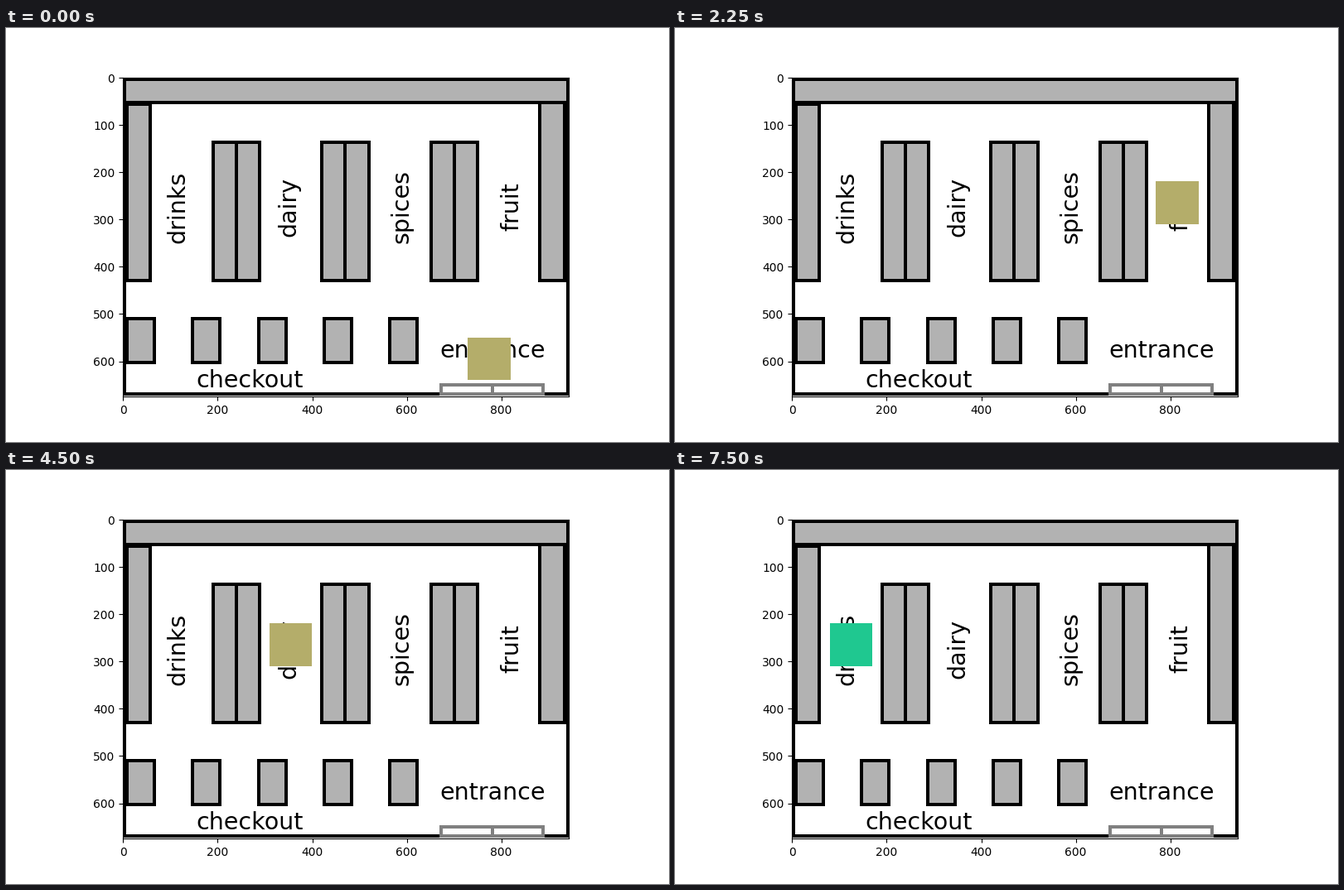
These frames come from a looping animation (800 by 500 pixels, 8000 ms). A matplotlib script:

```python
import matplotlib.pyplot as plt
from matplotlib.animation import FuncAnimation
from matplotlib.patches import Rectangle

INTERVAL = 250
FRAMES = 32
FRAMES_PER_STEP = 3
MAP_WIDTH, MAP_HEIGHT = 943, 675
SHELF = "#b2b2b2"
OLIVE, GREEN = "#b4ad6a", "#1fc890"
LINE_PX = 4
CUSTOMER_SIZE = 90

# Top-left corner of the customer at each place
PLACES = {
    "entrance": (730, 550),
    "fruit": (770, 220),
    "spices": (540, 220),
    "dairy": (310, 220),
    "drinks": (80, 220),
    "checkout": (205, 590),
}
VISITS = [
    (OLIVE, "entrance fruit spices fruit fruit spices dairy dairy checkout"),
    (GREEN, "entrance drinks"),
]
ROUTE = [(color, place) for color, path in VISITS for place in path.split()]

fig, ax = plt.subplots(figsize=(8, 5), dpi=100)
ax.set_xlim(-0.5, MAP_WIDTH - 0.5)
ax.set_ylim(MAP_HEIGHT - 0.5, -0.5)
ax.set_aspect("equal")


def box(left, top, right, bottom, face=SHELF, edge="black"):
    ax.add_patch(Rectangle((left, top), right - left, bottom - top,
                           facecolor=face, edgecolor=edge,
                           linewidth=LINE_PX * 72 / fig.dpi, zorder=1))


def label(text, x, y, rotation=0):
    ax.text(x, y, text, family="DejaVu Sans", size=20.5, rotation=rotation,
            rotation_mode="anchor", ha="left", va="baseline", zorder=1.5)


def draw_store():
    box(3, 3, 940, 669, face="white")
    box(3, 3, 940, 52)
    box(8, 55.5, 58, 429)
    box(882, 52, 933, 429)
    for aisle in range(3):
        left = 190 + 230.5 * aisle
        box(left, 137, left + 49.5, 429)
        box(left + 49.5, 137, left + 99, 429)
    for till in range(5):
        left = 8.5 + 139 * till
        box(left, 510.5, left + 57.5, 602.5)
    for left, right in ((672.5, 781), (781, 889)):
        box(left, 650, right, 669, face="white", edge="gray")

    label("drinks", 129, 349.5, 90)
    label("dairy", 365, 336.5, 90)
    label("spices", 602.5, 350.5, 90)
    label("fruit", 837, 323.5, 90)
    label("entrance", 669, 592.5)
    label("checkout", 153.5, 655)


draw_store()
customer = ax.add_patch(Rectangle((0, 0), CUSTOMER_SIZE, CUSTOMER_SIZE,
                                  linewidth=0, zorder=2))


def update(frame):
    color, place = ROUTE[frame // FRAMES_PER_STEP]
    x, y = PLACES[place]
    customer.set_xy((x - 0.5, y - 0.5))  # pixel edges lie half a unit off
    customer.set_facecolor(color)
    return [customer]


animation = FuncAnimation(fig, update, frames=FRAMES, interval=INTERVAL,
                          repeat=True, repeat_delay=0)
plt.show()
```
